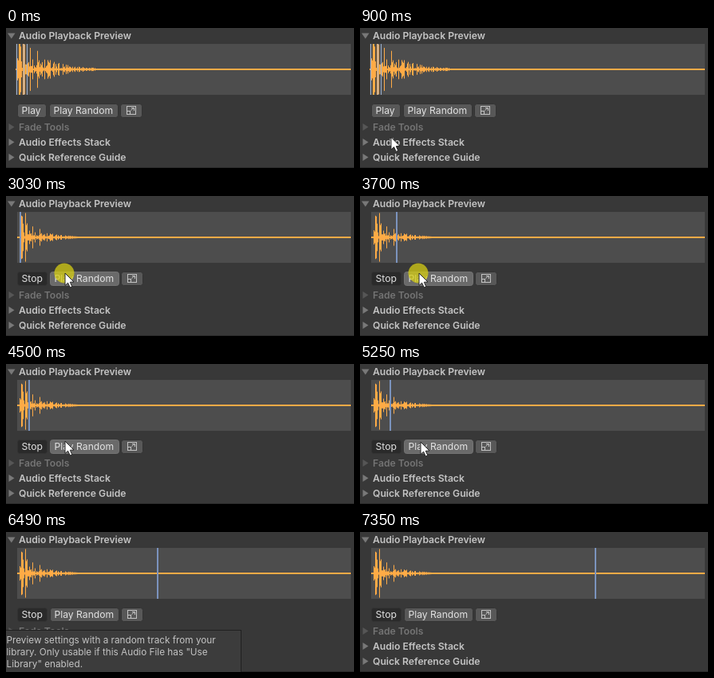
Recreate the animation shown at these times as an HTML page with a canvas. Size 436 px wide and 176 px high, loop 7390 ms.

```html
<!DOCTYPE html>
<html lang="en">
<head>
<meta charset="utf-8">
<title>Audio Playback Preview</title>
<style>
html, body { margin: 0; width: 100%; height: 100%; overflow: hidden; background: #383838; }
canvas { display: block; }
</style>
</head>
<body>
<canvas id="stage" width="436" height="176"></canvas>
<script>
const ctx = document.getElementById('stage').getContext('2d');
const LOOP = 7390;
const FONT = 'Inter, "Open Sans", sans-serif';
const ORANGE = '#ffab46', BLUE = '#7b93bd';

// Start time and playhead speed in px/ms of each sound.
const SOUNDS = [
  { start: 3010, speed: 0.2 },
  { start: 3444, speed: 0.125 },
  { start: 4462, speed: 0.385 },
  { start: 5054, speed: 0.1224 },
];
const PRESSES = [2990, 3600, 4600], PRESS_TIME = 150;

const within = (t, from, to) => t >= from && t < to;
const mix = (a, b, k) => a + (b - a) * k;

function ease(t, from, to) {
  const k = Math.min(1, Math.max(0, (t - from) / (to - from)));
  return k * k * (3 - 2 * k);
}

function noise(i) {
  const v = Math.sin(i * 12.9898 + 4.1) * 43758.5453;
  return v - Math.floor(v);
}

function rect(x, y, w, h, color) {
  ctx.fillStyle = color;
  ctx.fillRect(x, y, w, h);
}

function text(str, x, y, color, size, weight = 400) {
  ctx.font = `${weight} ${size}px ${FONT}`;
  ctx.fillStyle = color;
  ctx.fillText(str, x, y);
}

function shape(points, fill, stroke) {
  ctx.beginPath();
  points.forEach(([x, y]) => ctx.lineTo(x, y));
  ctx.closePath();
  ctx.fillStyle = fill;
  ctx.fill();
  if (stroke) {
    ctx.strokeStyle = stroke;
    ctx.lineWidth = 1;
    ctx.stroke();
  }
}

function foldout(label, y, open, color = '#c4c4c4', arrow = '#787878') {
  shape(open ? [[2, y - 3], [11.5, y - 3], [6.8, y + 4]]
             : [[3.5, y - 4.5], [10.5, y], [3.5, y + 4.5]], arrow);
  text(label, 16, y + 4.5, color, 12.15, 600);
}

function button(x, w, label, fill = '#585858', border = '#333') {
  ctx.beginPath();
  ctx.roundRect(x + 0.5, 95.5, w - 1, 17, 3);
  ctx.fillStyle = fill;
  ctx.fill();
  ctx.strokeStyle = border;
  ctx.lineWidth = 1;
  ctx.stroke();
  text(label, x + 5.5, 108, '#e2e2e2', 12.15);
}

function expandIcon(x) {
  ctx.strokeStyle = '#c4c4c4';
  ctx.lineWidth = 1;
  ctx.strokeRect(x + 0.5, 98.5, 11, 10);
  ctx.strokeRect(x + 0.5, 104.5, 4, 4);
  ctx.beginPath();
  ctx.moveTo(x + 5.5, 103.5);
  ctx.lineTo(x + 9, 100.5);
  ctx.moveTo(x + 6, 100.5);
  ctx.lineTo(x + 9.5, 100.5);
  ctx.lineTo(x + 9.5, 104);
  ctx.stroke();
}

// A decaying burst of spikes, optionally stretched and amplified.
function waveform(left, start, stretch, gain) {
  rect(left, 20, 432 - left, 64, '#4d4d4d');
  rect(left, 51, 432 - left, 2, ORANGE);
  for (let i = 0; i < 72 * stretch; i++) {
    const level = 45 * gain * Math.exp(-i / stretch / 17);
    const h = Math.min(32, 1 + level * noise(i) ** 1.8);
    rect(start + i, 52 - h, 1, 2 * h, ORANGE);
  }
}

function tooltip() {
  rect(0, 123, 295, 53, '#202020');
  rect(0, 124, 294, 52, '#3c3c3c');
  ['Preview settings with a random track from your',
   'library. Only usable if this Audio File has "Use',
   'Library" enabled.'].forEach((line, i) => text(line, 0.5, 139.5 + 15 * i, '#c4c4c4', 11.75));
}

// The pointer glides in, nudges between two clicks and glides out again.
function pointerAt(t) {
  if (!within(t, 560, 5950)) return null;
  const enter = ease(t, 560, 1230), nudge = ease(t, 4700, 5000), leave = ease(t, 5600, 5950);
  return [mix(2, 74, enter) + 2 * nudge - 36 * leave, mix(180, 97, enter) + nudge + 82 * leave];
}

function drawPointer([x, y], pressed) {
  if (pressed) {
    ctx.beginPath();
    ctx.arc(x - 1, y, 12.5, 0, 7);
    ctx.fillStyle = 'rgba(214, 206, 20, 0.75)';
    ctx.fill();
  }
  const outline = [[0, 0], [0, 15.5], [3.6, 12.2], [6.2, 18], [8.8, 16.9], [6.3, 11.3], [11, 11]];
  shape(outline.map(([dx, dy]) => [x + dx, y + dy]), '#fff', '#222');
}

function draw(t) {
  const sound = SOUNDS.findLast(s => t >= s.start);
  const pointer = pointerAt(t);
  const hover = pointer && pointer[0] > 55 && within(pointer[1], 95, 113);
  const shift = sound ? 1 : 0;

  rect(0, 0, 436, 176, '#383838');
  foldout('Audio Playback Preview', 9.5, true);
  if (sound) {
    waveform(14, 17, 1, 1);
    rect(Math.round(13 + (t - sound.start) * sound.speed), 20, 2, 64, BLUE);
  } else {
    waveform(12, 14, 1.35, 1.6);
    [13, 22, 26].forEach(x => rect(x, 20, 1, 64, '#9eb2d0'));
  }

  button(14, 37 + shift, sound ? 'Stop' : 'Play', sound ? '#2a2a2a' : undefined);
  if (!hover) button(54 + shift, 87, 'Play Random');
  else if (sound) button(54 + shift, 87, 'Play Random', '#6a6a6a', '#747474');
  else button(54, 87, 'Play Random', '#646464');
  button(143 + shift, 28, '');
  expandIcon(151 + shift);

  foldout('Fade Tools', 124.5, false, '#747474', '#565656');
  foldout('Audio Effects Stack', 143.5, false);
  foldout('Quick Reference Guide', 162.5, false);
  rect(0, 175, 436, 1, '#2a2a2a');

  if (within(t, 1690, 2990) || within(t, 5830, 6700)) tooltip();
  if (pointer) drawPointer(pointer, PRESSES.some(p => within(t, p, p + PRESS_TIME)));
}

function frame() {
  draw(performance.now() % LOOP);
  requestAnimationFrame(frame);
}
frame();
</script>
</body>
</html>
```
